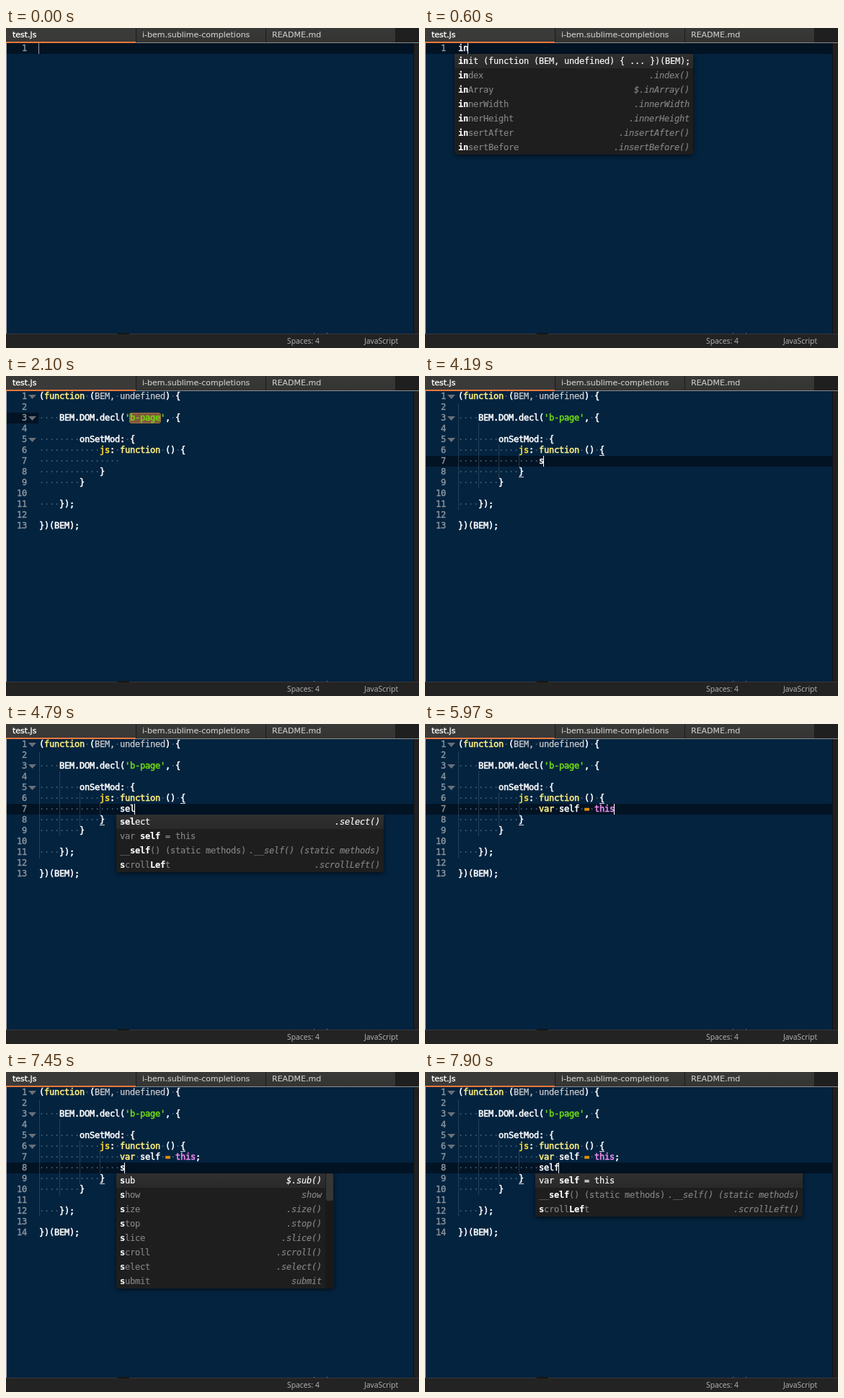
Recreate the animation shown at these times as an HTML page. Size 573 by 445 pixels, loop 8000 ms.

```html
<!DOCTYPE html>
<html lang="en">
<head>
<meta charset="utf-8">
<title>Editor completions</title>
<style>
html, body { margin: 0; width: 573px; height: 445px; overflow: hidden; background: #04233f; }
body { position: relative; }
div { position: absolute; box-sizing: border-box; white-space: pre; }
#view { left: 0; top: 0; }
.mono { font: 12px/15px "DejaVu Sans Mono", "Liberation Mono", monospace; letter-spacing: var(--gap); }
.tabs { left: 0; top: 0; width: 573px; height: 20px; background: #1f1f1f; }
.tab { top: 0; width: 180px; height: 20px; padding-left: 8px; background: linear-gradient(#393938, #343433);
  border-left: 1px solid #1b1b1b; color: #c8c8c8; font: 11px/20px "DejaVu Sans", sans-serif; -webkit-text-stroke: .15px; }
.tab.on { border-color: #3b3b3a; background: #3a3a39; color: #fff; -webkit-text-stroke: .35px; }
.status { left: 0; top: 425px; width: 573px; height: 20px; background: #232323; border-top: 1px solid #363636;
  color: #b8b8b8; font: 10.4px/19px "Open Sans", sans-serif; }
.status div { top: 0; }
.code { color: #fff; -webkit-text-stroke: .55px; }
.num { left: 1px; width: 28px; text-align: right; color: #8b959d; -webkit-text-stroke: .4px; }
.fold { left: 31px; width: 11px; height: 6px; background: #697078; clip-path: polygon(0 0, 100% 0, 50% 100%); }
.guide { width: 1px; background: repeating-linear-gradient(#4a6072 0 1px, transparent 1px 2px); }
.popup { background: #1e1e1e; border-radius: 0 0 4px 4px; box-shadow: 0 2px 6px rgba(0, 0, 0, .6); overflow: hidden; }
.item { left: 0; right: 0; height: 20px; line-height: 20px; padding-left: 5px; color: #858585; -webkit-text-stroke: .15px; }
.item b { color: #fff; }
.item i { position: absolute; top: 0; }
.item.on { background: linear-gradient(#303030, #292929); color: #fff; }
.dot { color: #4a6479; -webkit-text-stroke: 0; }
.param { color: #ccc; -webkit-text-stroke: .25px; }
</style>
</head>
<body>
<div id="view"></div>
<div class="tabs">
  <div class="tab on" style="left:0">test.js</div>
  <div class="tab" style="left:180px">i-bem.sublime-completions</div>
  <div class="tab" style="left:360px">README.md</div>
  <div style="left:540px;top:0;width:1px;height:20px;background:#1b1b1b"></div>
</div>
<div style="left:180px;top:20px;width:393px;height:1px;background:#8d8d8d"></div>
<div style="left:0;top:19px;width:180px;height:2px;background:#f5793a"></div>
<div style="left:0;top:21px;width:1px;height:404px;background:#a3a8ac"></div>
<div style="left:565px;top:21px;width:8px;height:404px;background:#202020;border-left:1px solid #111"></div>
<div class="status">
  <div style="left:390px">Spaces: 4</div>
  <div style="left:497px">JavaScript</div>
</div>
<div style="left:155px;top:424px;width:16px;height:2px;background:#151515"></div>
<div style="left:427px;top:424px;width:19px;height:1px;border:solid #8a8f94;border-width:0 1px"></div>
<script>
const LOOP = 8000, CELL = 7, ROW = 15, LEFT = 46, TOP = 21;
const view = document.getElementById('view');
const rowY = row => TOP + (row - 1) * ROW;
const colX = col => LEFT + col * CELL;

// Keep the monospace grid at whole pixels
const probe = document.createElement('span');
probe.className = 'mono';
probe.textContent = '0'.repeat(100);
document.body.append(probe);
const gap = CELL - probe.getBoundingClientRect().width / 100;
probe.remove();
document.documentElement.style.setProperty('--gap', gap + 'px');

// Completion lists: [label with *matched* parts, hint]
const INIT = ['*init* (function (BEM, undefined) { ... })(BEM);', ''];
const SELF = [
  ['var *self* = this', ''],
  ['__*self*() (static methods)', '.__self() (static methods)'],
  ['*s*croll*Lef*t', '.scrollLeft()']
];
const lists = {
  i: { width: 451, bar: true, items: [
    ['*i*nit (function (BEM, undefined) { ... })(BEM);', ''], ['*i*s', '.is()'], ['*i*ndex', '.index()'],
    ['*i*nArray', '$.inArray()'], ['*i*nnerWidth', '.innerWidth'], ['*i*nnerHeight', '.innerHeight'],
    ['*i*nsertAfter', '.insertAfter()'], ['*i*nsertBefore', '.insertBefore()']] },
  in: { width: 331, items: [
    ['*in*it (function (BEM, undefined) { ... })(BEM);', ''], ['*in*dex', '.index()'],
    ['*in*Array', '$.inArray()'], ['*in*nerWidth', '.innerWidth'], ['*in*nerHeight', '.innerHeight'],
    ['*in*sertAfter', '.insertAfter()'], ['*in*sertBefore', '.insertBefore()']] },
  ini: { width: 331, items: [INIT, ['*in*nerW*i*dth', '.innerWidth'], ['*in*nerHe*i*ght', '.innerHeight']] },
  init: { width: 331, items: [INIT, ['*in*nerW*i*d*t*h', '.innerWidth'], ['*in*nerHe*i*gh*t*', '.innerHeight']] },
  s: { width: 302, bar: true, items: [
    ['*s*ub', '$.sub()'], ['*s*how', 'show'], ['*s*ize', '.size()'], ['*s*top', '.stop()'],
    ['*s*lice', '.slice()'], ['*s*croll', '.scroll()'], ['*s*elect', '.select()'], ['*s*ubmit', 'submit']] },
  se: { width: 382, bar: true, items: [
    ['*se*lect', '.select()'], ['var *se*lf = this', ''], ['*se*rialize', '.serialize()'],
    ['__*se*lf() (static methods)', '.__self() (static methods)'], ['*s*lic*e*', '.slice()'],
    ['*s*iz*e*', '.size()'], ['*s*lid*e*Up', '.slideUp()'], ['*s*crollL*e*ft', '.scrollLeft()']] },
  sel: { width: 371, items: [['*sel*ect', '.select()'], ...SELF] },
  self: { width: 371, items: SELF }
};

const PAD = ' '.repeat(16);
const HEAD = ['(function (BEM, undefined) {', '', "    BEM.DOM.decl('b-page', {", '',
  '        onSetMod: {', '            js: function () {'];
const TAIL = ['            }', '        }', '', '    });', '', '})(BEM);'];
const VAR = 'var self = this';

const first = (text, more) => ({ lines: [text], row: 1, col: text.length, alpha: 1, ...more });
function doc(body, more) {
  const rows = body.map(s => PAD + s);
  return { lines: [...HEAD, ...rows, ...TAIL], body: body.length, row: 6 + body.length,
    col: rows[rows.length - 1].length, alpha: 1, folds: [1, 3, 5], ...more };
}
const block = alpha => doc([''], { row: 3, col: 24, sel: [18, 24], alpha });
const named = alpha => doc([VAR], { col: 24, sel: [20, 24], alpha });
const second = (text, more) => doc([VAR + ';', text], { folds: [1, 3, 5, 6], ...more });

const steps = [
  [0, first('', { alpha: .6 })], [150, first('', { alpha: 0 })],
  ...['i', 'in', 'ini', 'init'].map((s, k) => [450 + k * 150, first(s, { list: s })]),
  [1200, { ...block(1), folds: [] }], [1350, block(1)],
  [1800, block(.6)], [1950, block(.3)], [2100, block(0)],
  [2400, doc([''])], [3000, doc([''], { alpha: .6 })], [3150, doc([''], { alpha: .3 })],
  [3290, doc([''], { alpha: 0 })], [3590, doc([''], { alpha: .6 })], [3740, doc([''])],
  [4190, doc(['s'])], [4340, doc(['s'], { list: 's' })],
  [4640, doc(['se'], { list: 'se' })], [4790, doc(['sel'], { list: 'sel' })],
  [4930, doc(['self'], { list: 'self' })],
  [5080, named(1)], [5520, named(.6)], [5670, named(.3)], [5820, doc([VAR])],
  [6420, doc([VAR + ';'])], [6570, second('', { folds: [1, 3, 5] })], [6870, second('')],
  [7010, second('', { alpha: .6 })], [7160, second('', { alpha: .3 })],
  [7300, second('s')], [7450, second('s', { list: 's' })],
  [7600, second('se', { list: 'se' })], [7750, second('sel', { list: 'sel' })],
  [7900, second('self', { list: 'self' })]
];

const box = (x, y, w, h, style = '', cls = '', inner = '') =>
  `<div class="${cls}" style="left:${x}px;top:${y}px;width:${w}px;height:${h}px;${style}">${inner}</div>`;

const dots = s => s.replace(/ +/g, m => `<span class="dot">${'·'.repeat(m.length)}</span>`);
function tint(word) {
  if (word[0] === "'") return '#6fd613';
  if (word === 'this') return '#f08cf0';
  if (word === '=') return '#ff9d00';
  return word === 'js' ? '#ffdd33' : '#ffee80';
}
function token(word) {
  const look = word.startsWith('BEM') ? 'class="param"' : `style="color:${tint(word)}"`;
  return `<span ${look}>${dots(word)}</span>`;
}
function paint(line) {
  return line.split(/('[^']*'|BEM, undefined|\b(?:function|var|js|this)\b|=)/)
    .map((s, k) => k % 2 ? token(s) : dots(s)).join('');
}

function guides(extra) {
  const bars = [[0, 39, 186], [4, 66, 156], [8, 96, 141], [12, 111, 126]];
  return bars.map(([col, y, end]) => box(colX(col), y, 1, end + extra - y, '', 'guide')).join('');
}

function popup({ width, bar, items }, row, col) {
  const inset = bar ? 17 : 5;
  const rows = items.map(([label, hint], k) => {
    const text = label.split('*').map((s, n) => n % 2 ? `<b>${s}</b>` : s).join('');
    return `<div class="item${k ? '' : ' on'}" style="top:${k * 20}px">${text}<i style="right:${inset}px">${hint}</i></div>`;
  }).join('');
  const track = bar ? box(width - 12, 0, 12, 160, 'background:#191919') +
    box(width - 11, 0, 10, 38, 'background:#363636;border-radius:2px') : '';
  return box(colX(col) - 5, rowY(row + 1), width, items.length * 20, '', 'popup mono', rows + track);
}

function render(s) {
  const y = rowY(s.row);
  let html = box(1, y, s.sel ? 44 : 564, ROW, 'background:#021324');
  if (s.sel) {
    const [a, b] = s.sel;
    html += box(colX(a) - 1, y, (b - a) * CELL + 2, ROW, 'background:#85583a;border:1px solid #98703f;border-radius:3px');
  } else if (s.body) {
    html += guides((s.body - 1) * ROW);
    html += box(colX(28), rowY(6) + 14, CELL, 1, 'background:#d5dbe0');
    html += box(colX(12), rowY(7 + s.body) + 14, CELL, 1, 'background:#d5dbe0');
  }
  s.lines.forEach((line, k) => {
    const top = rowY(k + 1);
    html += `<div class="num mono" style="top:${top}px">${k + 1}</div>`;
    html += `<div class="code mono" style="left:${LEFT}px;top:${top}px">${paint(line)}</div>`;
  });
  for (const row of s.folds || []) html += `<div class="fold" style="top:${rowY(row) + 5}px"></div>`;
  html += box(colX(s.col) - 1, y, 1, ROW, `background:#fff;opacity:${s.alpha}`);
  if (s.list) html += popup(lists[s.list], s.row, s.col - s.list.length);
  view.innerHTML = html;
}

let shown = null;
const began = performance.now();
function tick() {
  const t = (performance.now() - began) % LOOP;
  const step = steps.findLast(([at]) => at <= t);
  if (step !== shown) render((shown = step)[1]);
  requestAnimationFrame(tick);
}
tick();
</script>
</body>
</html>
```
